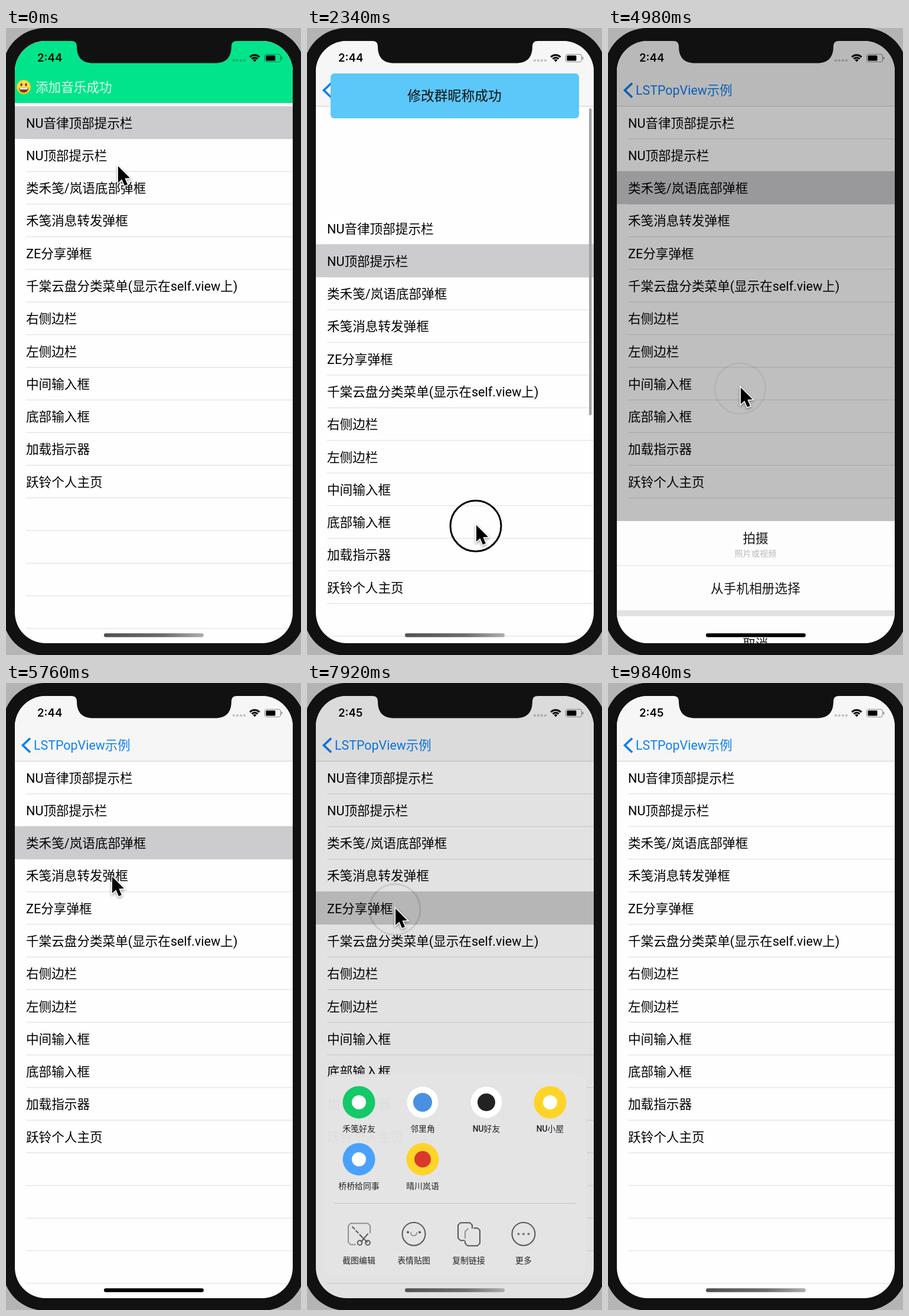
An HTML page with a canvas that plays this animation: 500 by 1062 pixels, repeating every 9.9 s.

```html
<!DOCTYPE html>
<html lang="zh-CN">
<head>
<meta charset="utf-8">
<title>LSTPopView示例</title>
<style>
html, body { margin: 0; width: 100%; height: 100%; overflow: hidden; background: #b4b4b4; }
canvas { display: block; width: 500px; height: 1062px; }
</style>
</head>
<body>
<canvas id="stage"></canvas>
<script>
const W = 500, H = 1062, LOOP = 9900, STEP = 60;
const canvas = document.getElementById('stage');
const c = canvas.getContext('2d');
const dpr = window.devicePixelRatio || 1;
canvas.width = W * dpr;
canvas.height = H * dpr;

const CJK = '"Noto Sans CJK SC", "Noto Sans CJK JP", "Noto Sans CJK", sans-serif';
const ROW_TOP = 132.6, ROW_H = 55.28;
const ROWS = [
  'NU音律顶部提示栏', 'NU顶部提示栏', '类禾笺/岚语底部弹框', '禾笺消息转发弹框',
  'ZE分享弹框', '千棠云盘分类菜单(显示在self.view上)', '右侧边栏', '左侧边栏',
  '中间输入框', '底部输入框', '加载指示器', '跃铃个人主页'
];

// Time tables: [ms, value...]
const SELECTED = [[0, 0], [1040, 1], [3740, 2], [5900, 3], [7700, 4], [9300, -1]];
const SCROLL = [[1780, 0], [2300, 179], [2520, 179], [3100, 0]];
const POINTER = [
  [0, 190, 234], [1250, 190, 234], [1740, 285, 500], [2300, 287, 842], [2560, 287, 842],
  [3600, 173, 268], [4140, 173, 268], [4660, 225, 609], [5100, 225, 609], [5760, 180, 328],
  [6080, 180, 328], [6460, 190, 848], [6900, 190, 848], [7580, 150, 382], [7980, 150, 382],
  [8500, 177, 502], [8880, 177, 502], [9480, 540, 760]
];
const PRESSES = [[1000, 1090], [1760, 2520], [3660, 3760], [4700, 4800],
  [5860, 5950], [6500, 6600], [7660, 7750], [8580, 8700]];

const clamp = v => Math.max(0, Math.min(1, v));
const part = (t, start, dur) => clamp((t - start) / dur);
const smooth = p => p * p * (3 - 2 * p);
const easeOut = p => 1 - (1 - p) ** 3;
const spring = p => p >= 1 ? 1 : 1 - Math.exp(-7 * p) * Math.cos(7 * p);

function track(keys, t, i = 1) {
  if (t <= keys[0][0]) return keys[0][i];
  for (let k = 1; k < keys.length; k++) {
    const a = keys[k - 1], b = keys[k];
    if (t < b[0]) return a[i] + (b[i] - a[i]) * smooth((t - a[0]) / (b[0] - a[0]));
  }
  return keys[keys.length - 1][i];
}

const hold = (keys, t) => keys.filter(k => k[0] <= t).pop()[1];

function rect(x, y, w, h, color) {
  c.fillStyle = color;
  c.fillRect(x, y, w, h);
}

function round(x, y, w, h, r, color) {
  c.beginPath();
  c.roundRect(x, y, w, h, r);
  if (color) { c.fillStyle = color; c.fill(); }
}

function disc(x, y, r, color) {
  c.beginPath();
  c.arc(x, y, r, 0, Math.PI * 2);
  c.fillStyle = color;
  c.fill();
}

function ring(x, y, r) {
  c.beginPath();
  c.arc(x, y, r, 0, Math.PI * 2);
  c.stroke();
}

function line(points, color, width) {
  c.beginPath();
  points.forEach(([x, y]) => c.lineTo(x, y));
  c.strokeStyle = color;
  c.lineWidth = width;
  c.stroke();
}

// y is the vertical centre of the glyphs
function text(s, x, y, size, color = '#000', align = 'left', weight = 400, face = 'Roboto') {
  c.font = `${weight} ${size}px ${face}, ${CJK}`;
  c.textAlign = align;
  c.fillStyle = color;
  c.fillText(s, x, y + size * 0.37);
}

function layer(alpha, draw) {
  if (alpha <= 0) return;
  c.save();
  c.globalAlpha *= alpha;
  draw();
  c.restore();
}

function list(t) {
  rect(15, 22, 471, 1020, '#fefefe');
  const top = ROW_TOP + track(SCROLL, t);
  const chosen = hold(SELECTED, t);
  for (let i = 0; i < 16; i++) {
    const y = top + i * ROW_H;
    rect(34, y + ROW_H - 0.6, 452, 1, '#dcdcde');
    if (i === chosen) rect(15, y - 0.6, 471, ROW_H + 0.6, '#ccccce');
    if (ROWS[i]) text(ROWS[i], 34, y + 28, 21.6);
  }
  layer(part(t, 1760, 120) * (1 - part(t, 4080, 300)), () =>
    round(478, 136, 4.5, 699 - track(SCROLL, t), 2.2, '#a3a3a5'));
}

function navBar() {
  rect(15, 22, 471, 110, '#f6f6f6');
  rect(15, 132, 471, 1, '#cfcfd1');
  c.lineCap = 'butt';
  line([[41, 93.5], [28.5, 105.5], [41, 117.5]], '#0f7ff2', 3.8);
  text('LSTPopView示例', 47, 105, 21.4, '#0f7ff2');
}

function smiley(x, y) {
  disc(x, y, 12, '#fbc531');
  disc(x, y - 1, 10.5, '#ffd94f');
  for (const dx of [-4, 4]) {
    c.beginPath();
    c.ellipse(x + dx, y - 4, 1.6, 2.6, 0, 0, 7);
    c.fillStyle = '#5d3510';
    c.fill();
  }
  c.beginPath();
  c.arc(x, y + 1.5, 8, 0, Math.PI);
  c.closePath();
  c.fillStyle = '#7a3d14';
  c.fill();
  rect(x - 6.5, y + 1.5, 13, 2.6, '#fff');
}

function greenBar(t) {
  const p = part(t, 420, 400);
  if (p >= 1) return;
  c.save();
  c.translate(0, -112 * p * p);
  rect(15, 22, 471, 105, '#02e48b');
  rect(15, 127, 471, 5.5, '#f8f8f8');
  smiley(30, 100);
  text('添加音乐成功', 50, 100, 21.6, 'rgba(255,255,255,.88)');
  c.restore();
}

function blueTip(t) {
  const shown = spring(part(t, 1080, 600)) - part(t, 2820, 260) ** 2;
  if (t < 1080 || t > 3080) return;
  const y = 77 - 165 * (1 - shown);
  round(40, y, 421, 76, 6, '#5bc8f9');
  text('修改群昵称成功', 250, y + 38, 22.8, '#0c0c0c', 'center');
}

function dim(t) {
  const sheet = part(t, 3900, 383) ** 3 * (1 - part(t, 4880, 300) ** 2.5);
  const dialog = part(t, 6000, 200) * (1 - part(t, 6740, 170));
  const share = part(t, 7800, 300) * (1 - part(t, 8760, 300));
  layer(0.27 * Math.max(sheet, dialog, share), () => rect(15, 22, 471, 1020, '#000'));
}

function sheet(t) {
  const show = part(t, 3900, 383), hide = part(t, 4880, 300);
  const y = 1042 - 274 * easeOut(show) + 274 * hide ** 1.28;
  layer(show ** 1.2 * (1 - hide ** 3.5), () => {
    rect(15, y, 471, 290, '#fefefe');
    text('拍摄', 250, y + 29, 21.6, '#111', 'center');
    text('照片或视频', 250, y + 54.5, 14.2, '#b5b5b5', 'center');
    rect(15, y + 75, 471, 1, '#e4e4e4');
    text('从手机相册选择', 250, y + 114, 21.7, '#111', 'center');
    rect(15, y + 151, 471, 10, '#e1e1e1');
    text('取消', 250, y + 208, 21.4, '#111', 'center');
  });
}

function dialog(t) {
  layer(part(t, 6000, 200) * (1 - part(t, 6740, 170)), () => {
    round(65, 381, 371, 302, 12, '#efefef');
    text('发送给:', 86, 412, 20, '#111', 'left', 700);
    rect(86, 438, 47, 46, '#dcdcdc');
    for (let i = 0; i < 9; i++) {
      const shade = ['#777', '#aaa', '#888', '#555', '#999', '#ccc', '#a9a48c', '#e2e2e2', '#bbb'][i];
      rect(87 + i % 3 * 15.5, 439 + Math.floor(i / 3) * 15.2, 14, 14, shade);
    }
    text('LuoNuNi Racing', 145, 461, 20, '#222');
    text('(10人)', 289, 461, 18.4, '#777');
    for (const y of [460, 529]) line([[405.5, y - 6.5], [412, y], [405.5, y + 6.5]], '#888', 2.2);
    text('给我打包个腌面', 86, 529, 16.7, '#777');
    rect(86, 558, 329, 40, '#e4e4e4');
    text('给朋友留言', 98, 578, 16.7, '#a5a5a5');
    rect(65, 628.5, 371, 1, '#d9d9d9');
    rect(250, 629, 1, 54, '#d9d9d9');
    text('取消', 155, 656, 19.8, '#222', 'center', 500);
    text('发送', 344, 656, 19.8, '#666', 'center', 500);
  });
}

function toolIcons() {
  const ink = '#555';
  c.lineCap = c.lineJoin = 'round';
  c.strokeStyle = ink;
  c.lineWidth = 2;
  // crop with scissors
  line([[82, 945], [74, 945], [70, 941], [70, 913], [74, 909], [103, 909], [107, 913], [107, 925]], '#909090', 2);
  c.setLineDash([5, 4]);
  line([[77, 915], [92, 931]], ink, 2);
  c.setLineDash([]);
  line([[91, 930], [102, 941]], ink, 2);
  line([[103, 927], [92, 940]], ink, 2);
  ring(89.5, 942, 3.8);
  ring(103, 942, 3.8);
  // face
  ring(181, 927, 19.5);
  disc(171, 924, 2, ink);
  disc(191, 924, 2, ink);
  c.beginPath();
  c.arc(181, 925, 5, 0, Math.PI);
  c.strokeStyle = '#909090';
  c.stroke();
  // two pages
  c.strokeStyle = ink;
  line([[266, 938], [260, 938], [256, 934], [256, 912], [260, 908], [276, 908], [280, 912], [280, 917]], ink, 2);
  line([[283, 917], [289, 917], [293, 921], [293, 943], [289, 947], [272, 947], [268, 943], [268, 939]], ink, 2);
  line([[268, 934], [268, 923], [273, 918]], '#909090', 2);
  // more
  c.strokeStyle = ink;
  ring(367, 927, 19.5);
  for (const x of [358.5, 367, 375.5]) disc(x, 927, 2, '#777');
}

function sharePanel(t) {
  const show = part(t, 7800, 560), hide = part(t, 8760, 300);
  if (show <= 0 || hide >= 1) return;
  c.save();
  c.translate(0, 390 * (1 - spring(show)) + 390 * hide ** 2);
  round(28, 656, 446, 343, 20, 'rgba(229,229,229,.97)');
  const apps = [
    ['禾笺好友', '#14c967', '#fff', 12], ['邻里角', '#fff', '#4a90e2', 16],
    ['NU好友', '#fff', '#222', 15], ['NU小屋', '#ffd428', '#fff', 12],
    ['桥桥给同事', '#4aa1fb', '#fff', 12], ['晴川岚语', '#ffd428', '#d9392c', 14]
  ];
  apps.forEach(([name, back, mark, r], i) => {
    const x = 88 + i % 4 * 108, y = 704 + Math.floor(i / 4) * 96.5;
    disc(x, y, back === '#fff' ? 26.5 : 27.5, back);
    disc(x, y, r, mark);
    text(name, x, y + 45, 13.9, '#222', 'center', 500);
  });
  rect(46, 874.5, 410, 1.5, '#cdcdcd');
  toolIcons();
  ['截图编辑', '表情贴图', '复制链接', '更多'].forEach((name, i) =>
    text(name, 88 + i * 93, 972, 13.9, '#222', 'center', 500));
  c.restore();
}

function statusBar(t) {
  text(t < 6000 ? '2:44' : '2:45', 53, 50.5, 18.6, '#000', 'left', 600, 'Inter');
  for (let i = 0; i < 4; i++) round(384 + i * 6, 53, 4, 4, 1.2, 'rgba(0,0,0,.2)');
  c.lineCap = 'butt';
  c.strokeStyle = '#000';
  c.lineWidth = 3;
  for (const r of [11.2, 6.7]) {
    c.beginPath();
    c.arc(421.5, 57, r, -Math.PI * 0.76, -Math.PI * 0.24);
    c.stroke();
  }
  c.beginPath();
  c.moveTo(421.5, 57.5);
  c.arc(421.5, 57, 4, -Math.PI * 0.76, -Math.PI * 0.24);
  c.fillStyle = '#000';
  c.fill();
  round(438.5, 44.5, 27, 13, 3.6);
  c.strokeStyle = 'rgba(0,0,0,.42)';
  c.lineWidth = 1.2;
  c.stroke();
  round(440.5, 46.5, 16, 9, 1.6, '#000');
  round(466.5, 48.8, 1.8, 4.4, 1, 'rgba(0,0,0,.42)');
}

function homeBar(t) {
  const g = c.createLinearGradient(166, 0, 335, 0);
  g.addColorStop(0, '#505050');
  g.addColorStop(0.6, '#6c6c6c');
  g.addColorStop(1, '#adadad');
  round(166, 1025.3, 169, 6.4, 3.2, t > 4200 && t < 6960 ? '#000' : g);
}

function phone() {
  rect(0, 0, W, H, '#b4b4b4');
  round(-6, 0, 513, 1063, 72, '#111');
}

function notch() {
  c.beginPath();
  c.moveTo(111, 21);
  c.lineTo(111, 22);
  c.quadraticCurveTo(120, 22, 120, 31);
  c.bezierCurveTo(120, 50, 129, 59.5, 148, 59.5);
  c.lineTo(354, 59.5);
  c.bezierCurveTo(373, 59.5, 382, 50, 382, 31);
  c.quadraticCurveTo(382, 22, 391, 22);
  c.lineTo(391, 21);
  c.closePath();
  c.fillStyle = '#111';
  c.fill();
}

function pointer(t) {
  const x = track(POINTER, t, 1), y = track(POINTER, t, 2);
  const press = PRESSES.find(([a, b]) => t >= a && t < b + 190);
  if (press) layer(1 - part(t, press[1], 190), () => {
    c.strokeStyle = '#000';
    c.lineWidth = 3;
    ring(x - 1, y + 1.5, 43);
  });
  if (x > 520) return;
  c.save();
  c.translate(x, y);
  c.beginPath();
  [[0, 0], [0, 28], [6.4, 22.2], [11, 33], [16, 31], [11.4, 20.5], [20, 20]].forEach(p => c.lineTo(...p));
  c.closePath();
  c.lineJoin = 'miter';
  c.strokeStyle = '#fff';
  c.lineWidth = 3;
  c.shadowColor = 'rgba(0,0,0,.4)';
  c.shadowBlur = 4;
  c.shadowOffsetY = 2 * dpr;
  c.stroke();
  c.shadowColor = 'transparent';
  c.fillStyle = '#000';
  c.fill();
  c.restore();
}

function draw(t) {
  c.setTransform(dpr, 0, 0, dpr, 0, 0);
  phone();
  c.save();
  round(15, 22, 471, 1020, 52);
  c.clip();
  list(t);
  navBar();
  greenBar(t);
  blueTip(t);
  dim(t);
  sheet(t);
  dialog(t);
  sharePanel(t);
  statusBar(t);
  homeBar(t);
  c.restore();
  notch();
  pointer(t);
}

const begin = performance.now();
function tick() {
  const t = (performance.now() - begin) % LOOP;
  draw(Math.floor(t / STEP) * STEP);
  requestAnimationFrame(tick);
}
tick();
</script>
</body>
</html>
```
